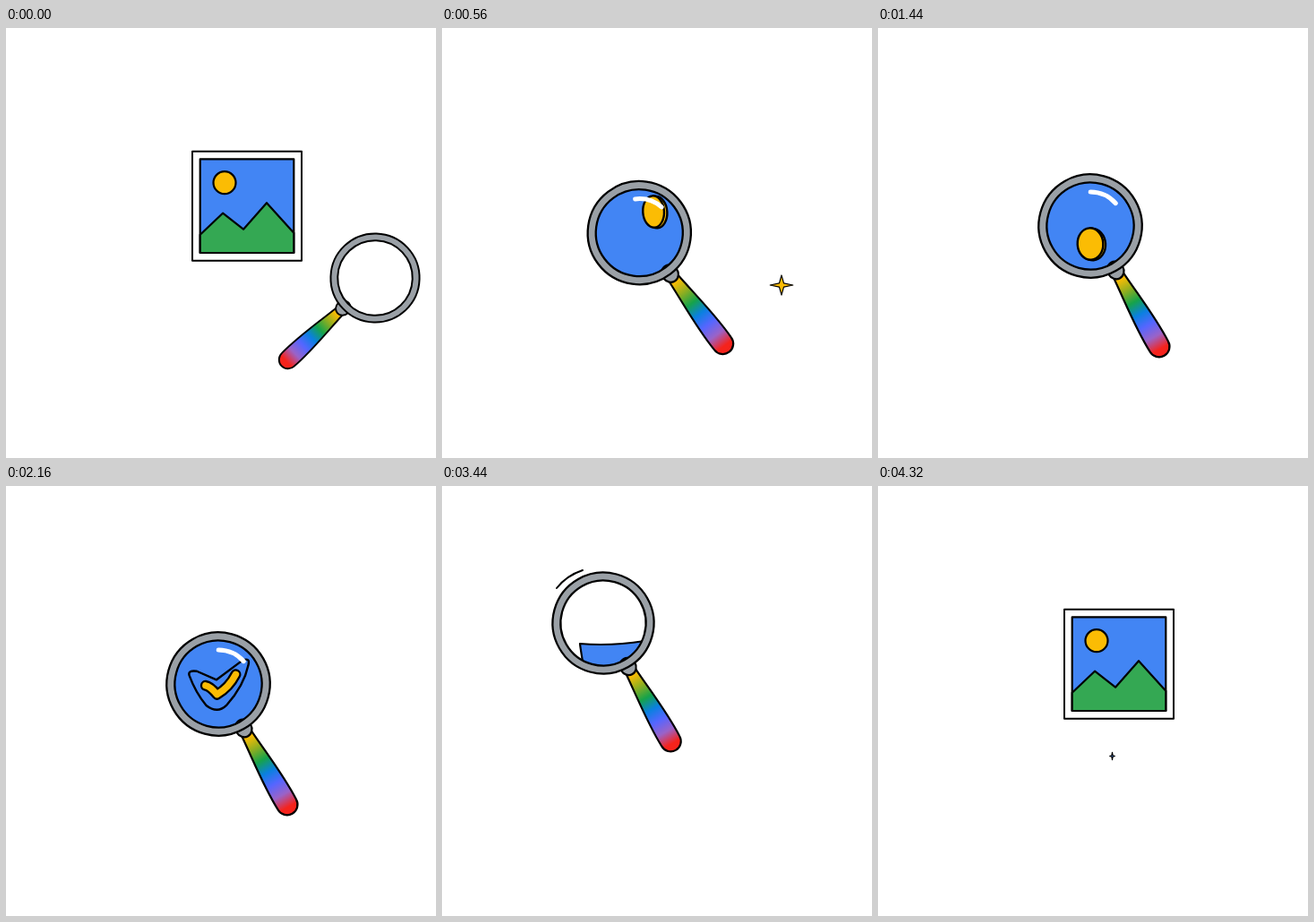
An HTML page with a canvas that plays this animation: 480x480 px, repeating every 4.4 s.

```html
<!DOCTYPE html>
<html lang="en">
<head>
<meta charset="utf-8">
<title>Magnifier</title>
<style>
  html, body { margin: 0; width: 100%; height: 100%; overflow: hidden; background: #fff; }
  canvas { display: block; width: 480px; height: 480px; }
</style>
</head>
<body>
<canvas id="stage" width="480" height="480"></canvas>
<script>
const LOOP = 4400, TAU = Math.PI * 2, DEG = Math.PI / 180;
const BLUE = '#4285f4', GREEN = '#34a853', YELLOW = '#fbbc04', GRAY = '#9aa0a6', INK = '#000';
const RAINBOW = [YELLOW, '#8fae20', '#16a34a', '#0a80e0', '#5566ff', '#9a63c8', '#f5231c'];
const c = document.getElementById('stage').getContext('2d');
c.lineCap = c.lineJoin = 'round';

// Eased progress from 0 to 1 between two times
function ramp(t, from, to) {
  const p = Math.min(1, Math.max(0, (t - from) / (to - from)));
  return p * p * (3 - 2 * p);
}
// A single rise and fall between two times
function pulse(t, from, to) {
  return t > from && t < to ? Math.sin(Math.PI * (t - from) / (to - from)) : 0;
}

const POSES = [
  { t: 40, x: 412, y: 279, angle: 136.8, s: .86 },
  { t: 240, x: 256, y: 218, angle: 67.6, s: .98 },
  { t: 600, x: 219, y: 229, angle: 52.5, s: 1 },
  { t: 1080, x: 237, y: 221, angle: 60.3, s: 1 },
  { t: 3040, x: 237, y: 221, angle: 60.3, s: 1 },
  { t: 3440, x: 180, y: 153, angle: 60.3, s: .98 },
  { t: 3720, x: 362, y: 205, angle: 60.3, s: .88 }
];
function lensPose(t) {
  const pose = { ...POSES[0] };
  for (let i = 1; i < POSES.length; i++) {
    const a = POSES[i - 1], b = POSES[i], e = ramp(t, a.t, b.t);
    for (const key in pose) pose[key] += (b[key] - a[key]) * e;
  }
  return pose;
}

function paint(fill, width, stroke = INK) {
  if (fill) { c.fillStyle = fill; c.fill(); }
  if (width) { c.lineWidth = width; c.strokeStyle = stroke; c.stroke(); }
}
function poly(...points) {
  c.beginPath();
  points.forEach(p => c.lineTo(...p));
  c.closePath();
}
function disc(x, y, rx, ry = rx, turn = 0) {
  c.beginPath();
  c.ellipse(x, y, rx, ry, turn, 0, TAU);
}
function box(half) {
  c.beginPath();
  c.rect(-half, -half, half * 2, half * 2);
}
function curve(x, y, ...quad) {
  c.beginPath();
  c.moveTo(x, y);
  c.quadraticCurveTo(...quad);
  paint(null, 2);
}

function photo(t) {
  if (t > 440 && t < 3520) return;
  const entering = t <= 440, lean = entering ? ramp(t, 120, 240) : 0;
  const size = entering ? 1 - .5 * ramp(t, 240, 440) : ramp(t, 3360, 3760);
  const bounce = pulse(t, 3760, 3920);
  c.save();
  c.translate(269 - 13 * lean, 198.7 + 7.3 * lean);
  c.transform(1, -.049 * lean, -.049 * lean, 1, 0, 0);
  c.scale(size * (1 - .02 * bounce), size * (1 + .08 * bounce));
  box(61); paint('#fff', 2);
  box(52.3); paint(BLUE, 2.2);
  disc(-25, -26, 12.5); paint(YELLOW, 2.2);
  poly([-52.3, 32], [-27, 8], [-4, 26], [22, -3.5], [52.3, 30], [52.3, 52.3], [-52.3, 52.3]);
  paint(GREEN, 2.2);
  c.restore();
}

function coin(t) {
  const x = 211 + 26 * ramp(t, 240, 600);
  const y = 205 + 36 * ramp(t, 1200, 1440) - 14 * ramp(t, 1440, 1680);
  const spin = Math.max(0, t - 480) / 1200 * 4 * Math.PI;
  const face = Math.max(.12, Math.abs(Math.cos(spin)));
  const edge = 4.6 * Math.sqrt(1 - face * face);
  for (const dx of [edge, 0]) {
    disc(x + dx, y + dx / 5, 17.7 * face, 17.7, -.06);
    paint(YELLOW, 2.4);
  }
}

// Outline around the check mark at distance d
function ripple(d) {
  c.beginPath();
  c.moveTo(235, 243.5 - 1.64 * d);
  c.lineTo(223 - .6 * d, 230 - 1.4 * d);
  c.quadraticCurveTo(221 - 1.1 * d, 222 - d, 222 - 1.05 * d, 228 - d);
  c.quadraticCurveTo(235 - 1.4 * d, 231, 236 - .75 * d, 230 + .9 * d);
  c.quadraticCurveTo(236, 238 + d, 236 + .6 * d, 230 + .9 * d);
  c.quadraticCurveTo(246 + 1.18 * d, 223, 256 + .88 * d, 216 - d);
  c.quadraticCurveTo(256 + d, 208 - d, 256 + .5 * d, 211 - d);
  c.closePath();
  paint(BLUE, 2.4);
}

function check(t) {
  const age = (t - 2080) % 640;
  if (t > 2080 && age > 0) ripple(5.8 + .135 * age);
  const m = Math.max(.02, ramp(t, 1680, 2000)), w = 37 - 25 * m;
  const at = (x, y) => [238 + (x - 238) * m, 227 + (y - 227) * m];
  c.beginPath();
  c.moveTo(...at(222.8, 222.8));
  c.quadraticCurveTo(...at(228, 223.5), ...at(235.5, 232.8));
  c.quadraticCurveTo(...at(249, 225), ...at(256.5, 210.3));
  paint(null, w);
  paint(null, w - 4.6, YELLOW);
}

function scene(t, x, y) {
  if (t < 200 || t > 3440) {
    c.translate(x, y); c.scale(1.2, 1.2); c.translate(-x, -y);
    photo(t);
    return;
  }
  // The blue sheet slides until its corner shows
  const back = 1 - ramp(t, 3040, 3440);
  const left = 154 - 44 * back, top = 176 - 80 * back;
  c.beginPath();
  c.moveTo(left + 40, top + 220);
  c.quadraticCurveTo(left + 2, top + 20, left, top);
  c.quadraticCurveTo(left + 34, top + 3, left + 72, top - 3);
  c.lineTo(left + 300, top - 20);
  c.lineTo(left + 300, top + 220);
  paint(BLUE, 2.2);
  const peak = 227 + 68 * ramp(t, 240, 560);
  poly([267, peak], [347, peak + 82], [192, peak + 82]);
  paint(GREEN, 2.4);
  if (t <= 1680) coin(t);
  else check(t);
}

function handle() {
  const g = c.createLinearGradient(68, 0, 158, 0);
  RAINBOW.forEach((color, i) => g.addColorStop(i / (RAINBOW.length - 1), color));
  c.beginPath();
  c.moveTo(62, -6);
  c.bezierCurveTo(95, -8.5, 125, -13, 155, -11.7);
  c.arc(155, 0, 11.7, -TAU / 4, TAU / 4);
  c.bezierCurveTo(125, 13, 95, 8.5, 62, 6);
  c.closePath();
  paint(g, 2.2);
  disc(57, 0, 10, 9);
  paint(GRAY, 2.2);
}

function magnifier(t) {
  if (t >= 3760) return;
  const { x, y, angle, s } = lensPose(t);
  c.save();
  disc(x, y, 50 * s);
  c.clip();
  c.fillStyle = '#fff';
  c.fillRect(0, 0, 480, 480);
  scene(t, x, y);
  c.restore();

  c.save();
  c.translate(x, y);
  c.rotate(angle * DEG);
  c.scale(s, s);
  handle();
  disc(0, 0, 53.1);
  paint(null, 11.4);
  paint(null, 6.8, GRAY);
  if (t < 3240) {
    c.beginPath();
    c.arc(0, 0, 38, -150 * DEG, -102 * DEG);
    paint(null, 5, '#fff');
  }
  c.restore();
}

function sparkle(x, y, rx, ry, color) {
  if (ry <= 0) return;
  c.beginPath();
  for (let i = 0; i < 8; i++) {
    const r = i % 2 ? .28 : 1, a = i * TAU / 8;
    c.lineTo(x + rx * r * Math.sin(a), y - ry * r * Math.cos(a));
  }
  c.closePath();
  paint(color, 1.2);
}
function sparkles(t) {
  const rise = pulse(t, 120, 800);
  sparkle(379, 287, 4 + 9 * pulse(t, 240, 800), 39 * rise * (1 - ramp(t, 160, 800)), YELLOW);
  sparkle(371, 186, 10 * pulse(t, 3760, 4240), 16 * pulse(t, 3760, 4240), YELLOW);
  const late = pulse(t, 3800, 4400);
  sparkle(261.5, 301.5, 7 * late, 10 * late, BLUE);
}

function speedLines(t) {
  if (t >= 200 && t < 320) {
    curve(303, 173, 321, 189, 320, 216);
    curve(284, 289, 300, 285, 316, 287);
    curve(293, 301, 301, 299, 310, 300);
  }
  if (t >= 3400 && t < 3520) curve(128, 114, 139, 100, 157, 94);
}

function draw(now) {
  const raw = now % LOOP;
  const step = raw < 800 || (raw >= 3200 && raw < 3360) ? 40 : 80;
  const t = Math.floor(raw / step) * step;
  c.fillStyle = '#fff';
  c.fillRect(0, 0, 480, 480);
  photo(t);
  magnifier(t);
  speedLines(t);
  sparkles(t);
}

const start = performance.now();
function frame() {
  draw(performance.now() - start);
  requestAnimationFrame(frame);
}
frame();
</script>
</body>
</html>
```
